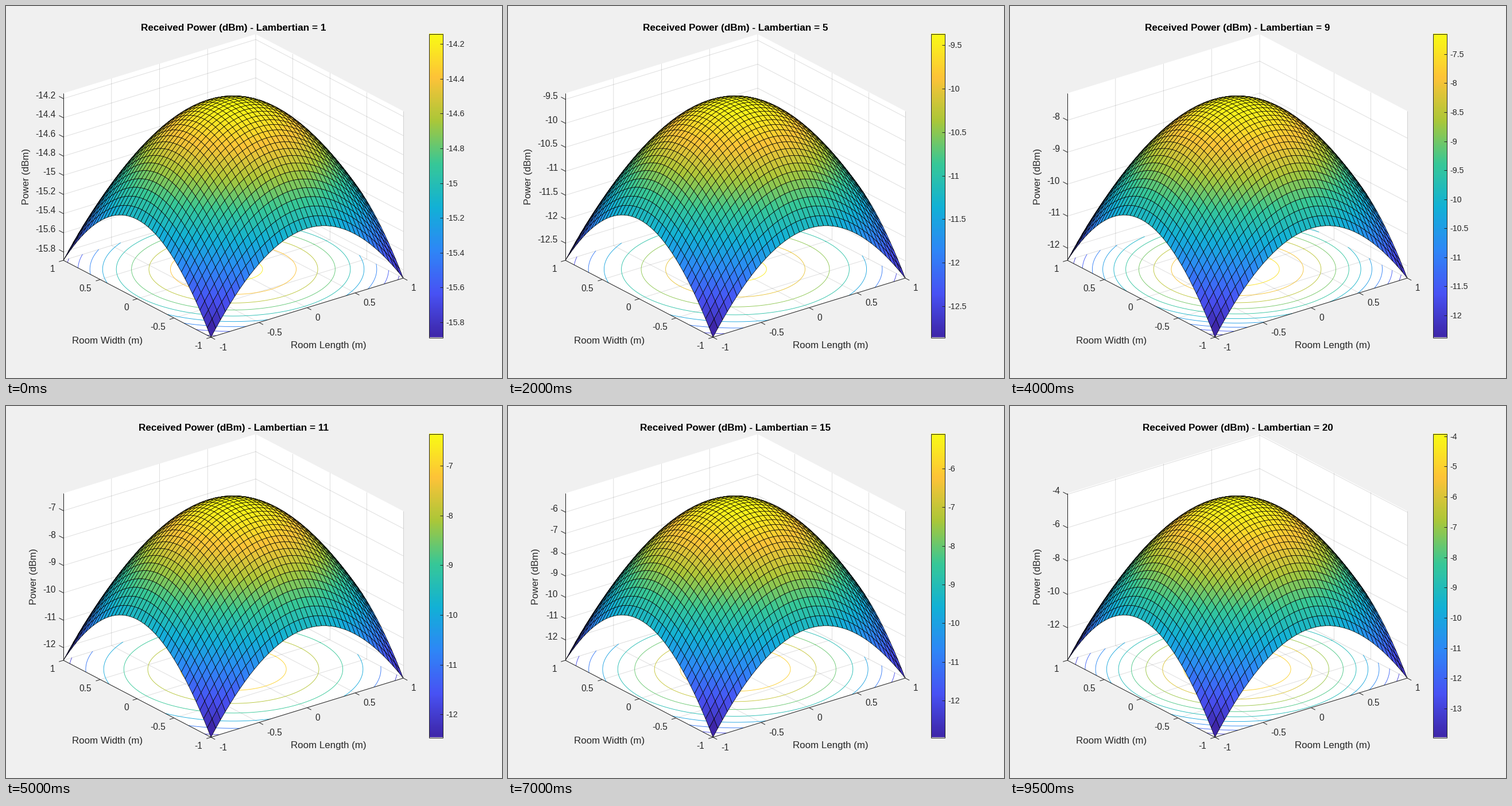
These frames come from a looping animation (864 by 648 pixels, 10 s). A matplotlib script:

```python
import numpy as np
import matplotlib.pyplot as plt
from matplotlib.animation import FuncAnimation
from matplotlib.collections import LineCollection, PolyCollection
from matplotlib.colors import LinearSegmentedColormap

WIDTH, HEIGHT, DPI = 864, 648, 100
PX = 72 / DPI                      # points per pixel
DARK = (0.15, 0.15, 0.15)
GRID = (0.15, 0.15, 0.15, 0.15)
ROOM_HEIGHT_SQ = 9.0               # lamp 3 m above the receivers
PEAK_AT_ONE = -14.144              # dBm under the lamp for order 1
CELLS = 40
TICKS = np.linspace(-1, 1, 5)
BOX_H = 291
BAR_L, BAR_R, BAR_T, BAR_B = 736.5, 761, 49, 577.5

POWER_MAP = LinearSegmentedColormap.from_list("power", [
    "#3e26a8", "#4852f4", "#2e87f7", "#12b1d6",
    "#37c897", "#abc739", "#fec338", "#f9fb15"])

plt.rcParams["font.family"] = "Liberation Sans"
fig = plt.figure(figsize=(WIDTH / DPI, HEIGHT / DPI), dpi=DPI,
                 facecolor=(0.94, 0.94, 0.94))
ax = fig.add_axes([0, 0, 1, 1])


def project(length, width, h=0.0):
    """Room coordinates and relative height (0..1) to stage pixels."""
    x = 396 + 167.5 * length - 128.5 * width
    y = 458.5 - 51.5 * length - 67 * width - BOX_H * h
    return np.stack(np.broadcast_arrays(x, y), axis=-1)


def relative_height(length, width):
    """Log falloff from lamp axis to corner; the same for every order."""
    r_sq = length**2 + width**2
    return 1 - np.log1p(r_sq / ROOM_HEIGHT_SQ) / np.log1p(2 / ROOM_HEIGHT_SQ)


def add_lines(segments, color, z):
    lines = LineCollection(segments, colors=color, linewidths=PX, zorder=z)
    return ax.add_collection(lines, autolim=False)


def add_text(x, y, s, size, ha="center", color=DARK, **kw):
    return ax.text(x, y, s, fontsize=size * PX, ha=ha, va="baseline",
                   color=color, zorder=10, **kw)


def tick_step(span, limit):
    return next(s for s in (0.2, 0.5, 1, 2) if span / s < limit)


def multiples(lo, hi, step):
    return np.arange(np.ceil(lo / step), np.floor(hi / step) + 1) * step


def label(value):
    return f"{round(value, 1):g}"


def draw_room():
    floor = [project(-1, -1), project(1, -1), project(1, 1), project(-1, 1)]
    back = [project(-1, 1), project(1, 1), project(1, 1, 1), project(-1, 1, 1)]
    side = [project(1, -1), project(1, 1), project(1, 1, 1), project(1, -1, 1)]
    ax.add_collection(PolyCollection([floor, back, side], facecolors="white",
                                     edgecolors="none", zorder=1))
    grid = []
    axes = [[project(-1, -1), project(1, -1)],
            [project(-1, -1), project(-1, 1)],
            [project(-1, 1), project(-1, 1, 1)]]
    for t in TICKS:
        grid += [[project(t, -1), project(t, 1), project(t, 1, 1)],
                 [project(-1, t), project(1, t)]]
        if t < 1:
            grid.append([project(1, t), project(1, t, 1)])
        px, py = p = project(t, -1)
        axes.append([p, p + (7.2, 3.8)])
        add_text(px + 13.8, py + 22.5, label(t), 15.5, "left")
        px, py = p = project(-1, t)
        axes.append([p, p + (-7.8, 2.4)])
        add_text(px - 15, py + 20.3, label(t), 15.5, "right")
    add_lines(grid, GRID, 2)
    add_lines(axes, DARK, 4)
    add_text(562, 596, "Room Length (m)", 16.9)
    add_text(176.5, 588, "Room Width (m)", 16.9)


def draw_surface():
    g = np.linspace(-1, 1, CELLS + 1)
    length, width = np.meshgrid(g, g, indexing="ij")
    h = relative_height(length, width)
    p = project(length, width, h)
    quads = np.stack([p[:-1, :-1], p[1:, :-1], p[1:, 1:], p[:-1, 1:]], axis=2)
    # far cells first, so that near ones cover them
    quads = quads.reshape(-1, 4, 2)[::-1]
    shades = POWER_MAP(h[:-1, :-1].ravel()[::-1])
    # neighbours share their edges, so each stroke is thin
    ax.add_collection(PolyCollection(quads, facecolors=shades, edgecolors="black",
                                     linewidths=0.68 * PX, zorder=5),
                      autolim=False)


def draw_colorbar():
    ax.imshow(np.linspace(1, 0, 256)[:, None], cmap=POWER_MAP, aspect="auto",
              extent=(BAR_L, BAR_R, BAR_B, BAR_T), interpolation="nearest",
              zorder=6)
    ax.add_patch(plt.Rectangle((BAR_L, BAR_T), BAR_R - BAR_L, BAR_B - BAR_T,
                               fill=False, ec=DARK, lw=PX, zorder=8))


draw_room()
draw_surface()
draw_colorbar()
ax.set_xlim(0, WIDTH)
ax.set_ylim(HEIGHT, 0)
ax.axis("off")

title = add_text(396.5, 42.5, "", 17.1, color="black", weight="bold")
power = add_text(40, 297.5, "Power (dBm)", 16.8, rotation=90,
                 rotation_mode="anchor")
changing = []
angle = np.linspace(0, 2 * np.pi, 1441)


def draw_contour(radius, color):
    length, width = radius * np.cos(angle), radius * np.sin(angle)
    p = project(length, width)
    p[np.maximum(abs(length), abs(width)) > 1] = np.nan
    changing.extend(ax.plot(p[:, 0], p[:, 1], color=color, lw=0.9 * PX, zorder=3))


def update(frame):
    order = frame + 1
    while changing:
        changing.pop().remove()
    slope = 5 * (order + 3)
    top = PEAK_AT_ONE + 10 * np.log10((order + 1) / 2)
    span = slope * np.log10(1 + 2 / ROOM_HEIGHT_SQ)
    bottom = top - span

    title.set_text(f"Received Power (dBm) - Lambertian = {order}")
    step = tick_step(span, 10)
    power.set_x(40 if step < 1 else 53)

    grid, ticks = [], []
    for v in multiples(bottom, top, step):
        h = (v - bottom) / span
        left = project(-1, 1, h)
        grid.append([left, project(1, 1, h), project(1, -1, h)])
        ticks.append([left, left + (-7.6, -4)])
        changing.append(add_text(87, left[1] - 0.6, label(v), 15.5, "right"))

    for v in multiples(bottom, top, tick_step(span, 12)):
        h = (v - bottom) / span
        y = BAR_B - h * (BAR_B - BAR_T)
        ticks.append([(BAR_R - 5, y), (BAR_R, y)])
        changing.append(add_text(766.8, y + 5, label(v), 14.3, "left"))
        radius = np.sqrt(ROOM_HEIGHT_SQ * (10 ** ((top - v) / slope) - 1))
        draw_contour(radius, POWER_MAP(h))

    changing.append(add_lines(grid, GRID, 2))
    changing.append(add_lines(ticks, DARK, 9))
    return changing


anim = FuncAnimation(fig, update, frames=20, interval=500, repeat=True,
                     repeat_delay=0, blit=False)
plt.show()
```
